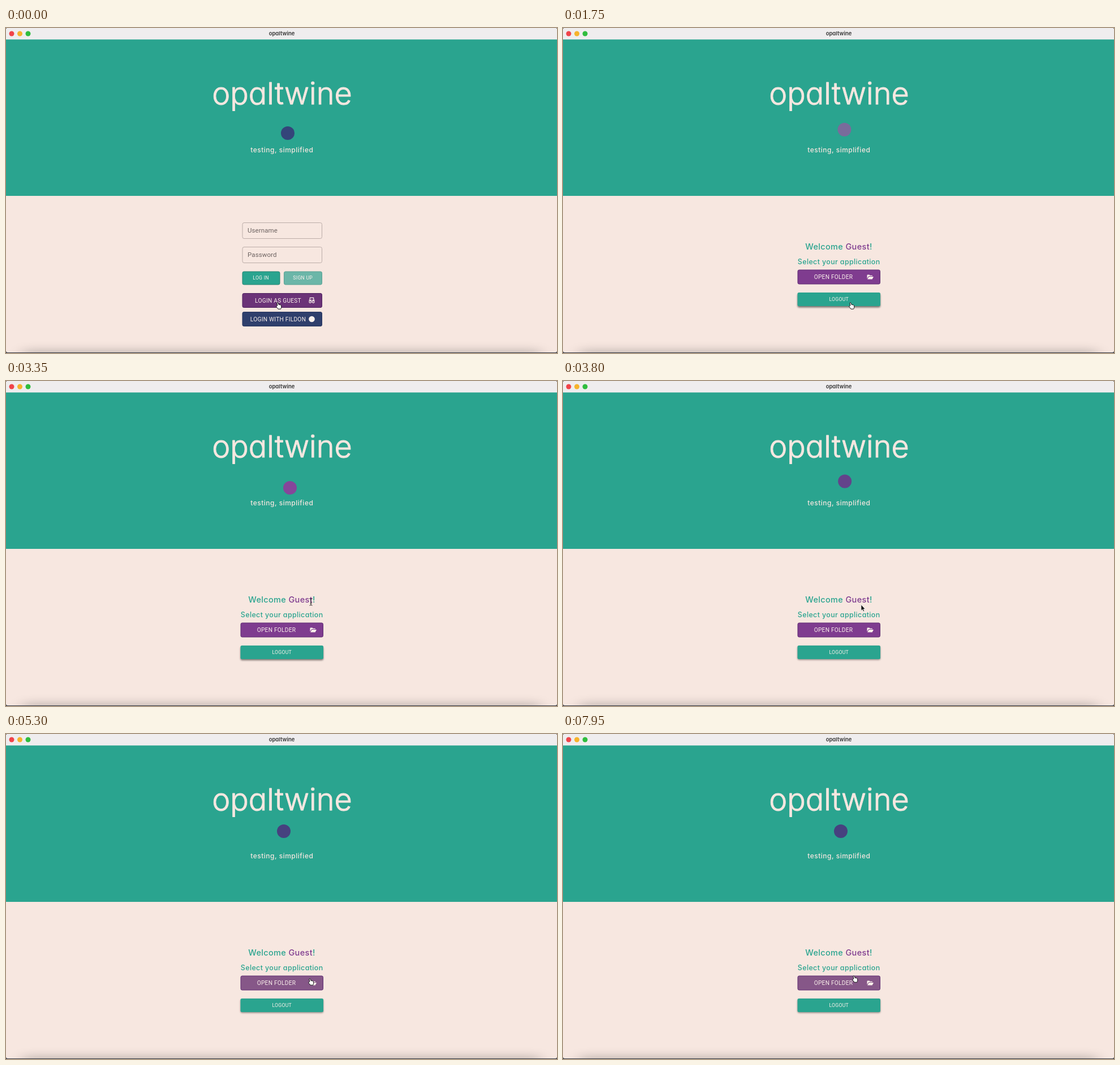
Recreate the animation shown at these times as an HTML page. Size 974 by 575 pixels, loop 8000 ms.

```html
<!DOCTYPE html>
<html lang="en">
<head>
<meta charset="utf-8">
<title>opaltwine</title>
<style>
  html, body { margin: 0; width: 100%; height: 100%; overflow: hidden; background: #343944; }
  svg { display: block; width: 100%; height: 100%; }
  text { text-anchor: middle; font: 400 10.2px Roboto, sans-serif; letter-spacing: .25px; fill: #fbf1ec; }
  .round { font-family: Inter, sans-serif; font-feature-settings: "cv11"; }
  .small { font-size: 8.7px; }
  .label { text-anchor: start; font-size: 11.5px; letter-spacing: .1px; fill: #6c6260; }
  .field { fill: none; stroke: #bcada8; }
  .mint { fill: #2aa48f; stroke: #248371; }
  .line { fill: none; stroke: #fbf1ec; stroke-width: 1.2; }
</style>
</head>
<body>
<svg viewBox="0 0 974 575">
  <defs>
    <clipPath id="window"><rect width="974" height="574" rx="3"/></clipPath>
    <filter id="blur" x="-10%" y="-400%" width="120%" height="900%"><feGaussianBlur stdDeviation="14 9"/></filter>
    <filter id="soft" x="-10%" y="-50%" width="120%" height="200%"><feGaussianBlur stdDeviation="1.5"/></filter>
  </defs>

  <g clip-path="url(#window)">
    <rect width="974" height="575" fill="#f7e7e0"/>
    <rect y="20" width="974" height="277" fill="#2aa48f"/>
    <rect width="974" height="20.3" fill="#efedee"/>
    <rect x="30" y="572" width="914" height="16" fill="#000" opacity=".26" filter="url(#blur)"/>
  </g>
  <circle cx="10" cy="10" r="4.5" fill="#f0444a"/>
  <circle cx="24.5" cy="10" r="4.5" fill="#f6b32c"/>
  <circle cx="39" cy="10" r="4.5" fill="#2fbd3e"/>
  <text class="round" x="487.5" y="13" style="font-size:9.5px;font-weight:600;letter-spacing:0;fill:#333">opaltwine</text>

  <text class="round" x="488" y="135" style="font-size:54px;font-weight:300;letter-spacing:0;fill:#f7e7e0;stroke:#f7e7e0;stroke-linejoin:round">opaltwine</text>
  <circle id="mark" r="12"/>
  <text class="round" x="487.8" y="220" style="font-size:12px;font-weight:500;letter-spacing:.5px;fill:#f7e7e0">testing, simplified</text>

  <g id="login">
    <rect class="field" x="418" y="344.5" width="140.5" height="28" rx="3"/>
    <text class="label" x="427" y="362">Username</text>
    <rect class="field" x="418" y="387.5" width="140.5" height="28" rx="3"/>
    <text class="label" x="427" y="405">Password</text>
    <rect class="mint" x="418" y="431" width="66" height="23" rx="2.5"/>
    <text class="small" x="450.5" y="445">LOG IN</text>
    <rect x="491.5" y="431" width="67" height="23" rx="2.5" fill="#6bb6a8" stroke="#58a193"/>
    <text class="small" x="524.7" y="445">SIGN UP</text>
    <rect id="guest" x="418" y="469.5" width="140.5" height="25" rx="2.5" stroke="#502460"/>
    <text x="481" y="485.6">LOGIN AS GUEST</text>
    <g class="line" transform="translate(540.5 481.5)">
      <path d="M-5.2 0H5.2M-3.2 0V-4.2H3.2V0M-1 3H1"/>
      <circle cx="-2.8" cy="3" r="1.8"/>
      <circle cx="2.8" cy="3" r="1.8"/>
    </g>
    <rect id="partner" x="418" y="502.5" width="140.5" height="25" rx="2.5" stroke="#26365f"/>
    <text x="481" y="518.6">LOGIN WITH FILDON</text>
    <circle cx="540.5" cy="515" r="5.3" fill="#fbf1ec"/>
  </g>

  <g id="welcome">
    <text class="round" x="487.5" y="392" style="font-size:14.5px;font-weight:500;letter-spacing:.35px;fill:#2aa48f">Welcome <tspan fill="#7f3c8f">Guest</tspan>!</text>
    <text class="round" x="487.7" y="418" style="font-size:12.4px;font-weight:500;letter-spacing:.4px;fill:#2aa48f">Select your application</text>
    <rect id="open" x="415" y="428" width="145.5" height="25" rx="2.5" stroke="#5f2d72"/>
    <text x="478" y="444.2">OPEN FOLDER</text>
    <path transform="translate(543 440.5)" fill="#fbf1ec" d="M-5.5 2.8V-3Q-5.5-4-4.5-4H-1.5L-.2-2.8H3.2Q4-2.8 4-1.4H-2.6ZM-5 4-2.2-.6H6L3.6 4Z"/>
    <rect id="shadow" x="414.5" y="469.5" width="146.5" height="24" rx="3" filter="url(#soft)"/>
    <rect x="414.5" y="468" width="146.5" height="24" rx="2.5" fill="#2aa48f"/>
    <text class="small" x="487.7" y="482.6">LOGOUT</text>
  </g>

  <g id="cursor">
    <path id="hand" fill="#fff" stroke="#111" stroke-linejoin="round" d="M-3.2-4.4Q-2-6-.8-4.4L.2-1.4Q3.6-1.8 4.6 0L4.8 3Q4.6 4.6 3.6 6.2H-1L-4.2 2.2Q-4.2.8-2-.2Z"/>
    <path id="beam" fill="none" stroke="#222" d="M-2.5-6Q0-6 0-4.6Q0-6 2.5-6M0-4.6V4.6M-2.5 6Q0 6 0 4.6Q0 6 2.5 6M-1.5 2H1.5"/>
    <path id="arrow" fill="#111" stroke="#fff" stroke-width=".8" d="M-3-6V5L-.6 2.8 1 6.4 2.8 5.6 1.2 2.2H4.4Z"/>
  </g>
</svg>
<script>
const DURATION = 8000, SWITCH = 1200;
const $ = id => document.getElementById(id);
const show = (id, on) => $(id).style.display = on ? '' : 'none';
const clamp = v => Math.max(0, Math.min(1, v));
const ramp = (t, from, to) => clamp((t - from) / (to - from));
const ease = k => k * k * (3 - 2 * k);
const mix = (a, b, k) => a.map((v, i) => v + (b[i] - v) * k);
const rgb = c => `rgb(${c.map(Math.round)})`;

// Each key is [time, ...values].
function track(keys, t) {
  let i = 0;
  while (i < keys.length - 2 && t >= keys[i + 1][0]) i++;
  const [a, b] = [keys[i], keys[i + 1]];
  return mix(a, b, ease(ramp(t, a[0], b[0]))).slice(1);
}

// x, y, red, green, blue
const markKeys = [
  [0, 498, 186, 52, 69, 122], [400, 508, 187, 69, 63, 128],
  [1200, 508, 187, 69, 63, 128], [2550, 479, 167, 211, 188, 203],
  [3350, 502, 189, 133, 70, 154], [4200, 495, 168, 71, 65, 127],
  [5000, 491, 172, 70, 65, 127]
];
const cursorKeys = [
  [0, 482, 491], [800, 482, 491], [1050, 510, 491], [3000, 510, 491],
  [3300, 539, 391], [3700, 539, 391], [4050, 494, 443], [4600, 494, 443],
  [5000, 539, 438], [5700, 539, 438], [7400, 516, 433]
];
const PURPLE = [127, 60, 143], HOVER = [85, 40, 98], PRESSED = [134, 87, 136];

// left, top, right, bottom
const textAreas = [[429, 378, 546, 396], [414, 405, 561, 422]];
const buttonAreas = [[415, 426, 561, 454], [415, 466, 561, 494]];
const inside = (x, y, [left, top, right, bottom]) => x >= left && x <= right && y >= top && y <= bottom;

function draw(t) {
  const [mx, my, ...color] = track(markKeys, t);
  $('mark').setAttribute('transform', `translate(${mx} ${my})`);
  $('mark').style.fill = rgb(color);

  show('login', t < SWITCH);
  show('welcome', t >= SWITCH);
  $('guest').style.fill = rgb(mix([107, 51, 120], HOVER, ramp(t, 0, 200)));
  $('partner').style.fill = rgb(mix([47, 63, 108], [49, 74, 120], ramp(t, 0, 250)));

  const hovered = mix(PURPLE, HOVER, ramp(t, 3900, 4150));
  $('open').style.fill = rgb(mix(hovered, PRESSED, ramp(t, 4650, 5000)));
  const settle = ramp(t, 3300, 3550);
  $('shadow').setAttribute('y', 470.5 - settle);
  $('shadow').style.opacity = .5 - .1 * settle;

  const [x, y] = track(cursorKeys, t);
  $('cursor').setAttribute('transform', `translate(${x} ${y})`);
  const hit = areas => areas.some(area => inside(x, y, area));
  const overText = t >= SWITCH && hit(textAreas);
  const overButton = t < SWITCH || hit(buttonAreas);
  show('hand', overButton);
  show('beam', overText);
  show('arrow', !overButton && !overText);
}

function frame(now) {
  draw(now % DURATION);
  requestAnimationFrame(frame);
}
draw(0);
requestAnimationFrame(frame);
</script>
</body>
</html>
```
